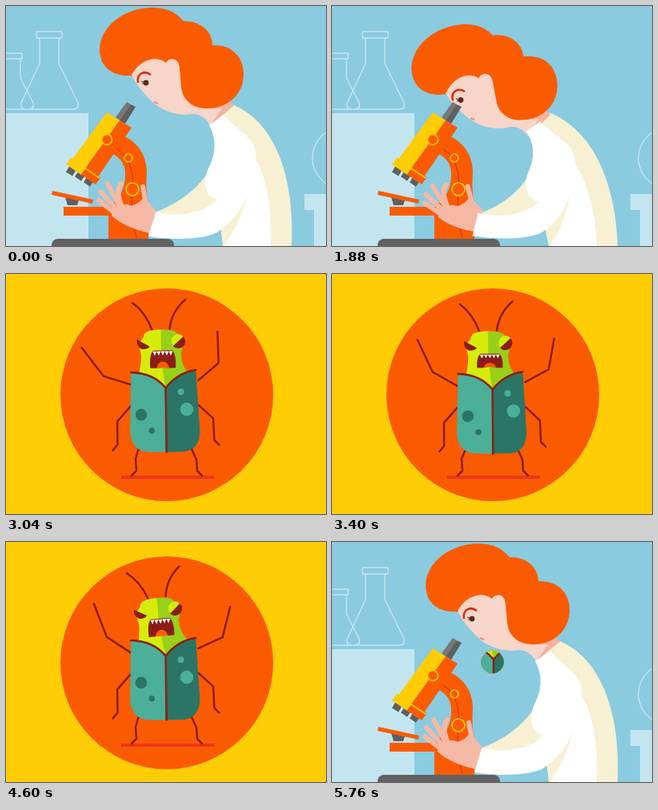
These frames come from a looping animation (400 px wide and 300 px high, 5840 ms). An HTML page:

```html
<!DOCTYPE html>
<html lang="en">
<head>
<meta charset="utf-8">
<title>Microscope</title>
<style>
html, body { margin: 0; width: 100%; height: 100%; overflow: hidden; }
svg { display: block; width: 100vw; height: 100vh; }
.line { fill: none; stroke: #8b1d17; stroke-width: 2.5; stroke-linejoin: round; stroke-linecap: round; }
.glass { fill: none; stroke: #c3e5f0; stroke-width: 1.4; stroke-linejoin: round; }
.pale { fill: #c3e5f0; }
.orange { fill: #fb5b00; }
.yellow { fill: #ffcd05; }
.ring { fill: #fb5b00; stroke: #ffcd05; stroke-width: 1.6; }
.cream { fill: #f7f0d2; }
.lime { fill: #d5ec0b; }
.green { fill: #98cf18; }
.teal { fill: #4caf98; }
.pine { fill: #2a7565; }
.dark { fill: #8b1d17; }
</style>
</head>
<body>
<svg viewBox="0 0 400 300">
  <clipPath id="iris"><circle id="hole" cx="200.5" cy="150" r="0"/></clipPath>

  <g id="lab">
    <rect width="400" height="300" fill="#8acbe0"/>
    <rect class="pale" y="134" width="103" height="166"/>
    <path class="glass" d="M38 32H70V40H38ZM42 40V72L19 121Q17 129 25 129H84Q92 129 90 121L66 72V40
      M0 59H20V66H0M18 66V90L34 121Q36 129 28 129H0"/>
    <circle class="glass" cx="421" cy="190" r="38"/>
    <path class="pale" d="M373 235H400V300H385V255H373Z"/>

    <g id="coat">
      <path class="cream" d="M285 124C332 144 361 205 357 300H271L264 242 262 190 266 139Z"/>
      <path class="cream" d="M255 204C238 232 212 248 186 258L190 268C220 266 248 256 270 240Z"/>
      <path fill="#fff" d="M272 300C291 275 304 240 311 190C328 215 333 265 331 300Z"/>
    </g>

    <g id="head">
      <path fill="#f2b3a0" d="M240 118 278 118 285 124 256 149Z"/>
      <path class="orange" d="M118 62C112 30 145 2 183 2C202 2 214 9 222 19C243 18 258 32 258 49
        C283 48 297 64 297 85C297 112 275 129 250 128L216 126 200 100 155 87C138 88 121 80 118 62Z"/>
      <path fill="#f7d5c8" d="M157 86C163 75 173 67 186 66Q196 67 200 71C203 64 217 63 217 79L219 100
        C220 118 234 128 250 128L270 128 255 149C250 141 245 136 234 135
        C215 138 199 132 188 124L182 119C172 109 162 98 157 86Z"/>
      <path fill="none" stroke="#dc2a10" stroke-width="2.5" d="M165 96C163 84 173 80 181 86"/>
      <path fill="none" stroke="#e8907e" stroke-width="2" d="M185 120 190 122"/>
      <g id="eye">
        <circle cx="175" cy="96" r="3.4" fill="#5a2a20"/>
        <path d="M169 94 175 96 170 97" fill="none" stroke="#5a2a20"/>
      </g>
    </g>

    <g id="scope">
      <path class="orange" d="M146 162C166 171 176 188 176 208Q174 232 178 245V292H128V262H72V251H128
        Q149 236 149 212 150 193 132 184Z"/>
      <path fill="none" stroke="#dc2a10" d="M138 178Q158 190 159 221M157 238Q157 268 163 290"/>
      <path fill="#777" d="M137 139 151 120 156 123 142 143Z"/>
      <path fill="#5f5f5f" d="M156 123 162 126 149 147 142 143Z"/>
      <path stroke="#5f5f5f" stroke-width="9.5" d="M85 200 79 210M96 207 90 216M107 214 101 223"/>
      <path class="yellow" d="M126 133 142 143 99 203 94 211 75 198 81 190 84 190Z"/>
      <path class="orange" d="M142 143 157 152 116 212 118 215 112 223 94 211 99 203Z"/>
      <path fill="none" stroke="#ffcd05" stroke-width="1.6" d="M99 203 117 215"/>
      <circle class="ring" cx="126" cy="167" r="6.5"/>
      <circle class="ring" cx="153" cy="190" r="5"/>
      <circle class="ring" cx="158" cy="229" r="8"/>
      <path fill="#5f5f5f" d="M74 239 91 243 89 249H77Z"/>
      <path class="orange" d="M58 231 109 242 108 247 57 236Z"/>
      <rect x="57" y="291" width="153" height="20" rx="8" fill="#636363"/>
    </g>

    <g id="hand" fill="#f5b8a5">
      <path d="M132 254Q145 247 152 248 160 253 172 240L178 245 188 257 180 284Q148 277 132 262Z"/>
      <path fill="none" stroke="#f5b8a5" stroke-width="6" stroke-linecap="round"
        d="M116 243 140 262M118 232 140 256M127 222 143 252M144 222Q136 230 146 254M171 226 176 252"/>
    </g>
    <g id="sleeve">
      <path id="arm" fill="#fff" d="M254 149 272 136C295 160 312 166 312 185C312 215 300 262 262 284
        C240 293 205 292 178 288L187 258C215 264 245 260 264 242C247 238 246 218 253 203C262 186 264 168 254 149Z"/>
    </g>
  </g>

  <g clip-path="url(#iris)">
    <rect class="yellow" width="400" height="300"/>
    <circle class="orange" cx="201" cy="151" r="133"/>
    <path stroke="#f0341c" stroke-width="4" d="M144 254H260"/>
    <path id="legs" class="line"/>
    <g id="bug">
      <path class="line" d="M158 169 141 188V217L135 224M243 169 261 186 262 213 268 219"/>
      <path id="armL" class="line" d="M104 88 126 127 158 142"/>
      <path id="armR" class="line" d="M275 81 271 120 243 138"/>
      <g id="face">
        <path class="line" d="M186 74Q178 52 162 40M208 73Q211 51 228 37"/>
        <path class="lime" d="M198 74C180 74 176 77 175 84C166 92 172 100 172 106C172 114 171 118 169 130L202 150Z"/>
        <path class="green" d="M197 74C211 74 217 76 218 81C229 88 223 98 222 104C222 114 224 120 231 130L202 150 197 110Z"/>
        <path class="lime" d="M212 94A8 8 0 0 1 225 83Z"/>
        <path class="dark" d="M167 86 183 95Q179 99 173 98 166 95 167 86ZM212 95 225 83A8.5 8.5 0 0 1 212 95Z"/>
        <path id="mouth" class="dark"/>
        <path id="tongue" class="orange"/>
        <path id="teeth" fill="#fff"/>
      </g>
      <path class="teal" d="M159 127Q187 128 202 147V227H182Q157 226 157 200Z"/>
      <path class="pine" d="M202 147Q217 128 240 125L244 200Q244 227 220 227H202Z"/>
      <g class="pine"><circle cx="171" cy="180" r="7.3"/><circle cx="184" cy="200" r="3.7"/></g>
      <g class="teal"><circle cx="221" cy="152" r="4"/><circle cx="228" cy="174" r="8.3"/></g>
      <path class="line" d="M159 127Q187 128 202 147 217 128 240 125M202 147V227"/>
    </g>
  </g>
</svg>
<script>
const LOOP = 5840, STEP = 40, LAST = 5760;
const el = id => document.getElementById(id);
const set = (id, name, value) => el(id).setAttribute(name, value);
const move = (id, value) => set(id, 'transform', value);
const clamp = v => Math.min(1, Math.max(0, v));
const part = (t, a, b) => clamp((t - a) / (b - a));
const ease = p => p * p * (3 - 2 * p);

// Eased value at time t through [time, value] pairs
function track(t, ...keys) {
  let value = keys[0][1];
  for (let i = 1; i < keys.length; i++) {
    const [a, from] = keys[i - 1], [b, to] = keys[i];
    if (t >= a) value = from + (to - from) * ease(part(t, a, b));
  }
  return value;
}

function drawLab(t) {
  const lean = t < 4000 ? ease(part(t, 400, 1000)) : 0;
  const turn = t > 800 && t < 2400 ? Math.sin(Math.PI * (t - 800) / 800) ** 2 : 0;
  const blink = 1 - 0.9 * Math.sin(Math.PI * part(t, 1320, 1520));
  const kx = 0.0765 * lean, ky = 0.053 * lean;
  const bend = `matrix(1 0 ${kx} ${1 - ky} ${-300 * kx} ${300 * ky})`;
  move('coat', bend);
  move('sleeve', bend);
  move('arm', `rotate(${turn} 290 185)`);
  move('head', `translate(${-14 * lean} ${21.5 * lean}) rotate(${-5.2 * lean} 175 96)`);
  move('eye', `translate(0 ${96 * (1 - blink)}) scale(1 ${blink})`);
  move('hand', `rotate(${-5 * turn} 165 245)`);
}

function drawBug(t) {
  const roar = t > 5380 ? 0 : 0.5 + 0.5 * Math.cos(2 * Math.PI * (t - 3040) / 1560);
  const dx = -2 * roar, dy = -4.5 * roar;
  const swing = track(t, [2600, 0], [3040, -7], [3440, 5], [3840, 0], [4280, 24], [4600, 9], [5100, 0]);
  const tilt = track(t, [3840, 0], [4600, -4], [5380, 0]);
  move('bug', `translate(${dx} ${dy}) rotate(${-0.8 * roar} 200 180)`);
  move('armL', `rotate(${swing} 158 142)`);
  move('armR', `rotate(${swing} 243 138)`);
  move('face', `rotate(${tilt} 200 145)`);
  set('legs', 'd', `M${168 + dx} ${222 + dy}L162 231 163 246 157 252M${233 + dx} ${221 + dy}L238 232 239 246 245 252`);

  const top = 105 - 5 * roar, low = 117 + 5 * roar, notch = low - 5 + 4 * roar;
  set('mouth', 'd', `M187 ${top}H211Q216 ${top + 5} 215 ${low}H207Q199 ${notch} 191 ${low}H183Q182 ${top + 5} 187 ${top}Z`);
  const tongue = low - 4 - 4 * roar;
  set('tongue', 'd', `M191 ${low}Q193 ${tongue} 199 ${tongue}T207 ${low}Q199 ${notch} 191 ${low}Z`);
  const tooth = 3.5 + 2 * roar;
  set('teeth', 'd', [0, 1, 2, 3, 4].map(i => `M${186.5 + 5 * i} ${top + 1}h5l-2.5 ${tooth}z`).join(''));
}

const start = performance.now();
function draw() {
  const now = (performance.now() - start) % LOOP;
  const t = Math.min(LAST, Math.floor(now / STEP) * STEP);
  drawLab(t);
  drawBug(t);
  set('hole', 'r', 255 * (t < 4000 ? part(t, 2560, 2800) : 1 - part(t, 5540, 5773)));
  requestAnimationFrame(draw);
}
draw();
</script>
</body>
</html>
```
